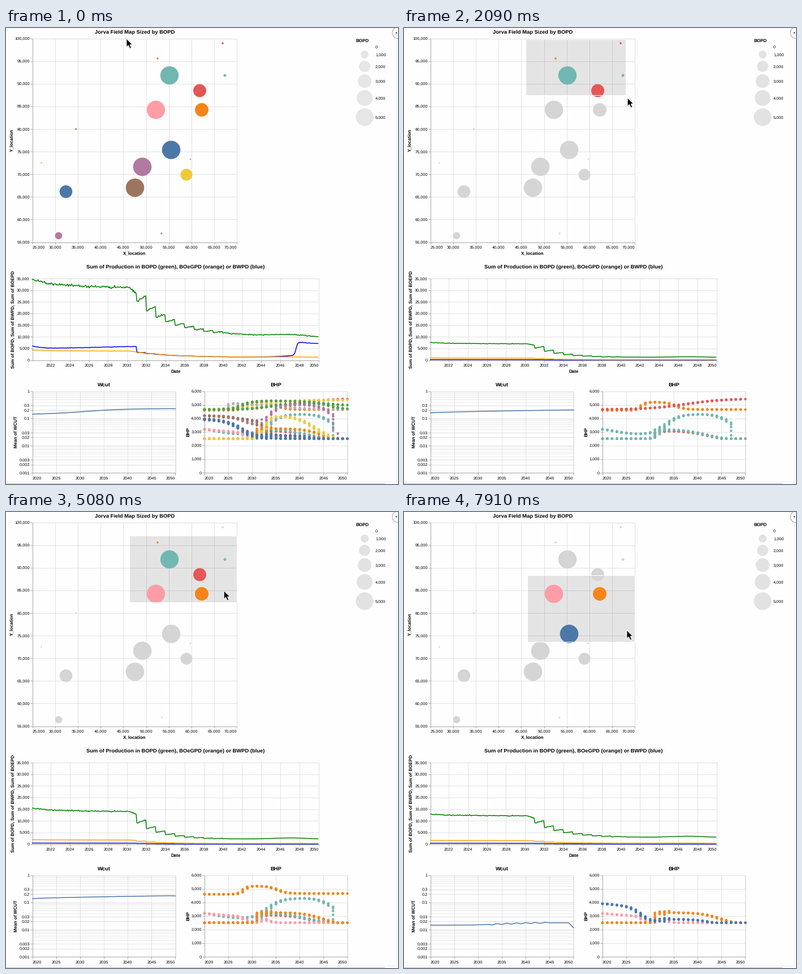
Animation of 693x808 px, one loop 8000 ms. Source, as a matplotlib script:

```python
import numpy as np
import matplotlib.pyplot as plt
from matplotlib.animation import FuncAnimation
from matplotlib.collections import LineCollection
from matplotlib.patches import Circle, Polygon, Rectangle

W, H, DPI = 693, 808, 64
PX = 72 / DPI
INTERVAL, FRAMES = 50, 160
START, STEP = 750, 149.17

plt.rcParams["font.family"] = "Liberation Sans"
plt.rcParams["text.hinting"] = "none"

BLUE, ORANGE, RED, TEAL, GREEN = "#4c78a8", "#f58518", "#e45756", "#72b7b2", "#54a24b"
YELLOW, PURPLE, PINK, BROWN, GREY = "#eeca3b", "#b279a2", "#ff9da6", "#9d755d", "#bab0ac"
FADED, GRID, AXIS = "#d5d5d5", "#dddddd", "#999999"

fig = plt.figure(figsize=(W / DPI, H / DPI), dpi=DPI, facecolor="#fefefe")
ax = fig.add_axes([0, 0, 1, 1])
ax.set_xlim(0, W)
ax.set_ylim(H, 0)
ax.axis("off")
rng = np.random.default_rng(7)

# ---------- static chart furniture ----------


def text(x, y, s, size=7.4, bold=False, ha="center", rotation=0):
    shift = 0.36 * size
    x, y = (x + shift, y) if rotation else (x, y + shift)
    ax.text(x, y, s, fontsize=size * PX, weight="bold" if bold else "normal",
            ha=ha, va="baseline", rotation=rotation, rotation_mode="anchor")


def segments(lines, color, width=0.8, z=1):
    ax.add_collection(LineCollection(lines, colors=color, linewidths=width * PX, zorder=z))


def chart(box, xticks, yticks, title, title_y, ylabel, ylabel_x, minor=()):
    """Ticks are (position, label) pairs."""
    x0, y0, x1, y1 = box
    segments([[(x0, y), (x1, y)] for y in minor], "#e4e4e4", 0.7)
    segments([[(x, y0), (x, y1)] for x, _ in xticks], GRID)
    segments([[(x0, y), (x1, y)] for y, _ in yticks], GRID)
    segments([[(x0, y0), (x1, y0)], [(x1, y0), (x1, y1)]], GRID)
    marks = [[(x0, y0), (x0, y1)], [(x0, y1), (x1, y1)]]
    marks += [[(x, y1), (x, y1 + 3.7)] for x, _ in xticks]
    marks += [[(x0 - 3.7, y), (x0, y)] for y, _ in yticks]
    segments(marks, AXIS, 0.8, 1.2)
    for x, s in xticks:
        ha = "left" if x - x0 < 1 else "right" if x1 - x < 1 else "center"
        text(x, y1 + 9, s, ha=ha)
    for y, s in yticks:
        text(x0 - 5.2, y, s, ha="right")
    text((x0 + x1) / 2, title_y, title, 9.4, True)
    text(ylabel_x, (y0 + y1) / 2, ylabel, 8, True, rotation=90)


def production_x(year):
    return 552.6 - (50 - year) * 16.915


def production_y(v):
    return 588.5 - v * 20.64 / 5000


def wcut_y(v):
    return 643.5 - 48.17 * np.log10(v)


def bhp_y(v):
    return 788 - v * 24.08 / 1000


def five_years(x0):
    return [(x0 + 42.08 * i, str(2020 + 5 * i)) for i in range(7)]


chart((47, 18.5, 408, 379.5),
      [(47 + 40.11 * i, f"{25000 + 5000 * i:,}") for i in range(10)],
      [(379.5 - 40.11 * i, f"{55000 + 5000 * i:,}") for i in range(10)],
      "Jorva Field Map Sized by BOPD", 7, "Y_location", 9.5)
text(227.5, 399, "X_location", 8, True)

chart((47, 444, 552.6, 588.5),
      [(production_x(y), str(2000 + y)) for y in range(22, 51, 2)],
      [(production_y(v), f"{v:,}") for v in range(0, 35001, 5000)],
      "Sum of Production in BOPD (green), BOeGPD (orange) or BWPD (blue)", 423,
      "Sum of BOPD, Sum of BWPD, Sum of BOEPD", 13)
text(300, 608, "Date", 8, True)

decades = [10.0 ** -e for e in (1, 2, 3)]
labelled = [1] + [d * m for d in decades for m in (3, 2, 1)]
chart((47, 643.5, 299.5, 788), five_years(47),
      [(wcut_y(v), f"{v:g}") for v in labelled],
      "Wcut", 632, "Mean of WCUT", 17,
      minor=[wcut_y(d * m) for d in decades for m in range(1, 10)])

chart((351, 643.5, 603.5, 788), five_years(351),
      [(bhp_y(v), f"{v:,}") for v in range(0, 6001, 1000)],
      "BHP", 632, "BHP", 321.5)


def dots(x, y, r, color, z):
    return ax.scatter(x, y, s=(2 * np.asarray(r) * PX) ** 2, c=color, linewidths=0, zorder=z)


text(618, 22, "BOPD", 8, True, "left")
sizes = np.arange(0, 5001, 1000)
legend_r = np.maximum(15.6 * np.sqrt(sizes / 5000), 0.6)
legend_y = (33, 47, 68, 94, 124, 158)
for v, y in zip(sizes, legend_y):
    text(653, y, f"{v:,}", ha="left")
legend = dots([634] * 6, legend_y, legend_r, "#e6e6e6", 3)

segments([[(689.5, 20), (689.5, 804)], [(0, 803.5), (689, 803.5)]], "#e6e6e6")
segments([[(0, 807), (669, 807)]], "#b8b8b8", 1)
ax.add_patch(Circle((693, 8.5), 10, fc="white", ec="#9a9a9a", lw=0.9 * PX, zorder=3))
ax.add_patch(Circle((690, 8.5), 1.2, fc="#333333", lw=0, zorder=4))

# ---------- well model (years counted from 2000) ----------

MONTHS = np.arange(20.1, 50.01, 1 / 12)
YEARS = np.arange(20, 51)
SAMPLES = np.arange(20, 50.01, 1 / 5)
NOISE = rng.normal(1, 0.01, MONTHS.size)
wells = []


def sigmoid(t, mid, width):
    return 1 / (1 + np.exp(-np.clip((t - mid) / width, -50, 50)))


def oil_rate(start, plateau, floor, drop, tau, bump, saw):
    """Plateau until 2031, then yearly sawtooth decline to a floor with a late bump."""
    t = MONTHS
    early = plateau + (start - plateau) * np.exp((20 - t) / 3)
    early = early * (1 - 0.09 * np.clip((t - 30.3) / 0.7, 0, 1))
    stepped = t < 40
    age = np.where(stepped, np.floor(t) - 31, t - 31.5)
    late = floor + drop * np.exp(-age / tau)
    late = late * (1 + stepped * saw * 0.9 ** age * (t % 1 - 0.5))
    late = late + bump * np.exp(-((t - 47) / 2.5) ** 2)
    return np.where(t < 31, early, late) * NOISE


def field_water():
    t = MONTHS
    early = 4700 + 1200 * np.exp(20.1 - t) + 100 * (t - 24.5)
    late = 1100 + 1900 * np.exp((31 - t) / 4) + 900 * np.exp(-abs(t - 47.6) / 1.6)
    late = late + 5700 * sigmoid(t, 47.65, 0.08)
    return np.where(t < 31, early, late) * NOISE


def pressure(start, *changes):
    """Smooth steps (amount, mid year, width), never below 2,500; unsteady in 2031-33."""
    v = start + sum(amount * sigmoid(SAMPLES, mid, width) for amount, mid, width in changes)
    unsteady = (SAMPLES >= 31) & (SAMPLES < 34) & (v < 4200)
    return np.maximum(v + unsteady * rng.uniform(-160, 160, v.size), 2500)


def well(x, y, r, color, bhp, oil=0 * MONTHS, water=None, wcut=0 * YEARS):
    px = 351 + 8.416 * (np.floor(SAMPLES + 1e-6) - 20)
    wells.append(dict(x=x, y=y, r=r, color=color, oil=oil, wcut=wcut,
                      water=0.03 * oil if water is None else water,
                      points=np.column_stack([px, bhp_y(bhp)])))


low_cut = 0.0127 + 0.003 * sigmoid(YEARS, 35, 3)
low_cut = low_cut + 0.0007 * (abs(YEARS - 38.5) < 6) * (-1.0) ** YEARS
low_cut[-1] *= 0.66
high_cut = 0.77 + 0.22 * ((YEARS - 20) / 30) ** 0.7
field_cut = 1.52 + 1.3 * sigmoid(YEARS, 32, 4)

teal_oil = oil_rate(5000, 5000, 950, 3300, 2.3, 250, 0.16)
red_oil = oil_rate(2600, 2000, 250, 1050, 2.8, 0, 0.16)
pair_oil = oil_rate(7900, 7000, 950, 3250, 2.3, 250, 0.16)
blue_oil = oil_rate(5000, 5150, 1900, 3500, 3.2, 250, 0.1)
field_oil = oil_rate(14300, 12000, 5200, 6100, 8, 100, 0.06)

# idle wells
well(268, 54, 1.8, ORANGE, pressure(4600, (600, 28.6, .5), (-550, 35.7, 1)))
well(383, 27, 1.8, RED, pressure(4650, (800, 38, 4)))
well(62.5, 239, 1.4, YELLOW, pressure(4650, (700, 32, 3)))
well(326, 232.5, 1.4, GREY, pressure(4630, (500, 25.4, .2), (-500, 36, 4)))
well(123.5, 179, 1.5, GREEN, pressure(4640, (650, 28.3, 1.2), (-350, 45, 2.5)))
well(275, 364, 1.5, GREEN, pressure(4650, (450, 34, 2), (-400, 47, 1)))
# producing wells
well(342.5, 111, 11.5, RED, pressure(2500, (580, 31.5, .3), (-700, 42.5, 2.2)),
     red_oil, wcut=low_cut)
well(289, 84, 16.2, TEAL, pressure(2500, (700, 31.7, .4), (-800, 42, 2.5)),
     teal_oil, wcut=low_cut)
well(387, 84, 2.5, TEAL,
     pressure(3300, (-500, 23, 2), (1500, 33.8, 1.4), (-600, 45.5, 1), (-2000, 47.8, .3)),
     wcut=high_cut)
well(93, 368, 6.3, PURPLE,
     pressure(4200, (-900, 29, 1.5), (1700, 34, 1), (-800, 46, 1.2), (-2200, 47.8, .3)))
well(241, 246, 16.3, PURPLE, pressure(4000, (-1500, 28, 2), (350, 36, 1.5), (-400, 42, 2)))
well(228, 283, 16.3, BROWN, pressure(4250, (-400, 26, 3), (-1000, 32.5, .8), (-500, 39, 3)))
well(265, 145, 16.2, PINK,
     pressure(3230, (-240, 23, 2), (-600, 29, .6), (300, 31.4, .3), (-300, 35, 1)),
     0.68 * pair_oil, wcut=low_cut)
well(346, 145, 12, ORANGE, pressure(2500, (750, 31.4, .3), (-900, 45, 2)),
     0.32 * pair_oil, wcut=low_cut)
well(319, 260, 10.5, YELLOW, pressure(2500, (1700, 33, .7), (-1800, 43.5, 2)),
     field_oil, field_water(), field_cut)
well(106, 290, 11.3, BLUE, pressure(3950, (-1450, 28, 2)))
well(292, 216, 16.3, BLUE,
     pressure(3950, (-250, 23, 2), (-1150, 28.3, 1.1), (200, 33, .5), (-350, 42.5, 1.5)),
     blue_oil, wcut=1.4 * low_cut)

# ---------- moving parts ----------

map_x, map_y = (np.array([w[k] for w in wells]) for k in "xy")
map_colors = np.array([w["color"] for w in wells])
bubbles = dots(map_x, map_y, [w["r"] for w in wells], map_colors, 3)
brush_fill = ax.add_patch(Rectangle((0, 0), 1, 1, fc="#333333", alpha=0.125, lw=0, zorder=2))
brush_edge = ax.add_patch(Rectangle((0, 0), 1, 1, fill=False, ec="white", lw=PX, zorder=4))
bhp_dots = dots([0], [0], 2.25, "k", 3)


def line(x, color, width=1.5):
    return ax.plot(x, np.zeros(len(x)), color=color, lw=width * PX, zorder=3)[0]


oil_line, water_line, gas_line = (line(production_x(MONTHS), c) for c in ("green", "blue", "orange"))
wcut_line = line(47 + 8.416 * (YEARS - 20), BLUE)

ARROW = np.array([(0, 0), (0, 14.8), (3.4, 11.6), (6, 17.4), (8.6, 16.3), (6.1, 10.6), (10.6, 10.6)])
cursor = ax.add_patch(Polygon(ARROW, fc="black", ec="white", lw=0.9 * PX, zorder=9))


def corner(step):
    """Lower right corner while the brush is drawn."""
    keys = (0, 3, 9, 13)
    return np.array([np.interp(step, keys, (222, 280, 392, 404.5)),
                     np.interp(step, keys, (24, 60, 119, 138.5))])


def pose(step):
    """Brush bounds (left, top, right, bottom) and pointer tip."""
    if step < 22:
        grab = np.clip((step - 20) / 2, 0, 1)
        tip = corner(step + 1) * (1 - grab) + np.array([382, 117]) * grab
        return (215, 20, *corner(step)), tip
    top = np.interp(step, (22, 29, 34, 48), (20, 41.5, 53, 111.5))
    left = min(215 + (step - 22), 218)
    tip = np.array([382 + (step - 22) * 0.46, top + 98])
    return (left, top, min(left + 190, 408), top + 118), tip


def total(key, picked):
    return sum(w[key] for w in picked)


def show_selection(mask):
    picked = [w for w, m in zip(wells, mask) if m]
    bubbles.set_facecolors(list(np.where(mask, map_colors, FADED)))
    for artist in (oil_line, water_line, gas_line, wcut_line, bhp_dots):
        artist.set_visible(bool(picked))
    if not picked:
        return
    oil = total("oil", picked)
    oil_line.set_ydata(production_y(oil))
    water_line.set_ydata(production_y(total("water", picked)))
    gas_line.set_ydata(production_y(0.125 * oil))
    mean = total("wcut", picked) / len(picked)
    wcut_line.set_ydata(wcut_y(np.where(mean > 0, mean, 1)))
    wcut_line.set_alpha(1 if mean.any() else 0.4)
    bhp_dots.set_offsets(np.vstack([w["points"] for w in picked]))
    bhp_dots.set_facecolors([w["color"] for w in picked for _ in SAMPLES])


def update(i):
    step = np.floor((i * INTERVAL + 45 - START) / STEP)
    brushing = step >= 0
    (left, top, right, bottom), tip = pose(step)
    for box in (brush_fill, brush_edge):
        box.set_bounds(left, top, right - left, bottom - top)
        box.set_visible(brushing)
    inside = (map_x > left) & (map_x < right) & (map_y > top) & (map_y < bottom)
    show_selection(inside if brushing else np.ones(len(wells), bool))
    legend.set_facecolors("#e2e2e2" if brushing else "#e6e6e6")
    cursor.set_xy(ARROW + (tip if brushing else (213, 19)))
    return []


anim = FuncAnimation(fig, update, frames=FRAMES, interval=INTERVAL, repeat=True, repeat_delay=0,
                     init_func=lambda: update(0))
plt.show()
```
